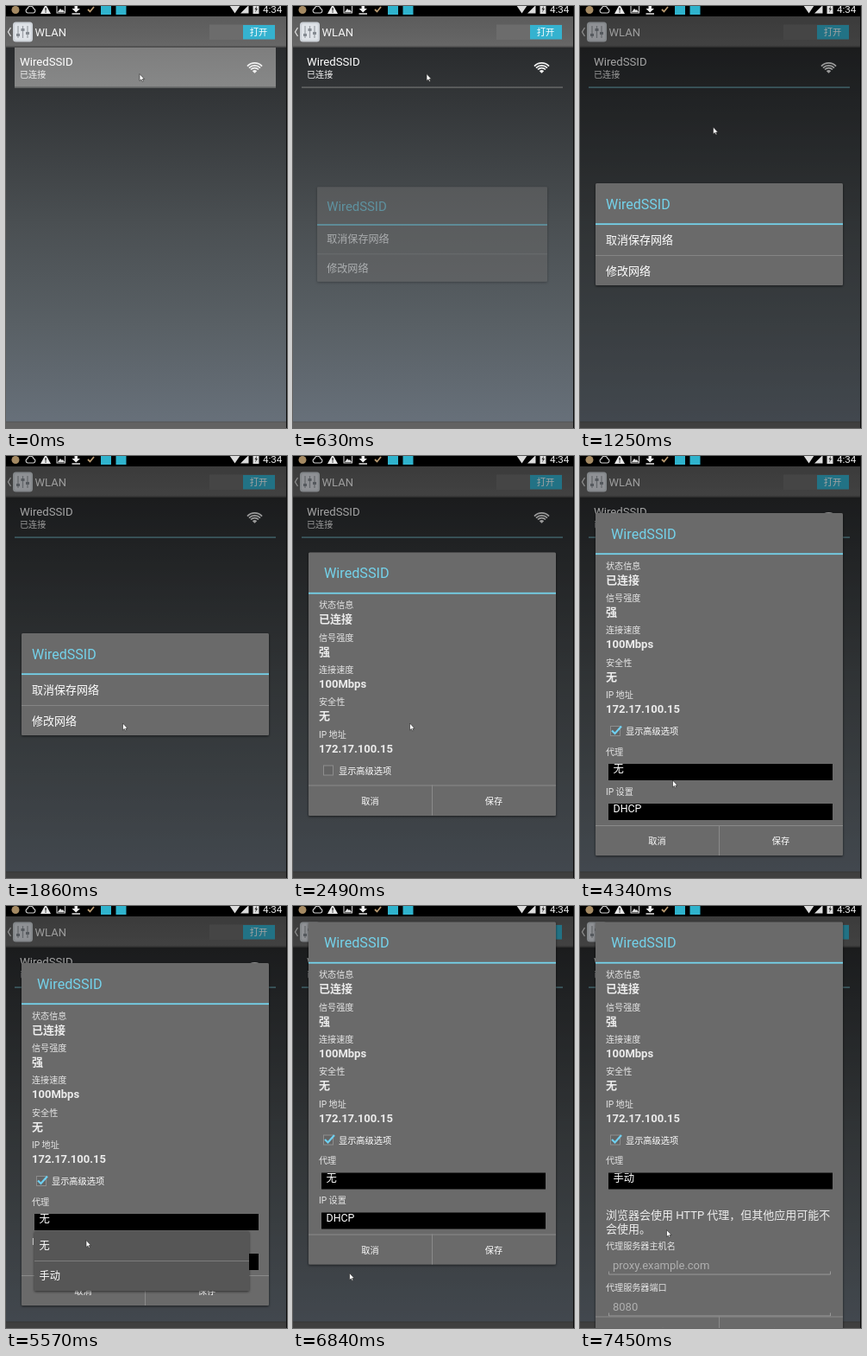
Recreate the animation shown at these times as an HTML page. Size 326x488 px, loop 8 s.

```html
<!DOCTYPE html>
<html lang="zh-CN">
<head>
<meta charset="utf-8">
<title>WLAN</title>
<style>
html, body { margin: 0; width: 100%; height: 100%; overflow: hidden; background: #000; }
svg { display: block; width: 326px; height: 488px; }
text { font-family: Roboto, "Noto Sans CJK SC", "Noto Sans CJK", sans-serif; white-space: pre; }
</style>
</head>
<body>
<svg id="stage" viewBox="0 0 326 488" xmlns="http://www.w3.org/2000/svg"></svg>
<script>
const LOOP = 8000;
const CYAN = '#74d2ea';
const stage = document.getElementById('stage');

const text = (x, y, size, str, fill = '#fff', extra = '') =>
  `<text x="${x}" y="${y}" font-size="${size}" fill="${fill}" ${extra}>${str}</text>`;
const rect = (x, y, w, h, fill, extra = '') =>
  `<rect x="${x}" y="${y}" width="${w}" height="${h}" fill="${fill}" ${extra}/>`;
const path = (d, fill, extra = '') => `<path d="${d}" fill="${fill}" ${extra}/>`;
const line = (d, stroke, width = 1) => path(d, 'none', `stroke="${stroke}" stroke-width="${width}"`);
const group = (id, body, extra = '') => `<g id="${id}" ${extra}>${body}</g>`;

// Fan with its point at (x, y), made of arcs
function wifi(x, y, r, fill) {
  const arc = k => {
    const dx = r * k * 0.72, dy = r * k * 0.69;
    return `M${x - dx} ${y - dy}A${r * k} ${r * k} 0 0 1 ${x + dx} ${y - dy}`;
  };
  return path(arc(0.3) + `L${x} ${y}Z`, fill) +
    line(arc(0.5) + arc(0.72) + arc(0.95), fill, r * 0.14);
}

function statusBar() {
  return rect(0, 0, 326, 12, '#000') +
    '<circle cx="11" cy="4.5" r="4.5" fill="#a58a63"/>' +
    path('M25 8a2.6 2.6 0 0 1 0-5a3.6 3.6 0 0 1 7 0a2.6 2.6 0 0 1 0 5Z', 'none', 'stroke="#ccc" stroke-width="1.2"') +
    path('M46 -2L52 9H40Z', '#e8e8e8') + rect(45.4, 2, 1.3, 3.5, '#222') + rect(45.4, 6.4, 1.3, 1.2, '#222') +
    rect(59, -2, 9.5, 10, 'none', 'stroke="#ddd" stroke-width="1"') + path('M60 7L63 3L65 5L66 4L68 7Z', '#ddd') +
    path('M79.5 -2H83V3H86L81.2 7.5L76.5 3H79.5Z', '#eee') + rect(76.5, 8.3, 9.5, 1.4, '#eee') +
    line('M95 4L97.5 6.5L102 1', '#b99a72', 1.8) +
    rect(110, -2, 12, 12, '#2fb3cd') + rect(127.5, -2, 12, 12, '#2fb3cd') +
    path('M259 -1H272L265.5 8.5Z', '#ddd') +
    path('M272 8.5L281.5 -1V8.5Z', '#ddd') +
    rect(286.5, -2, 7, 11, '#ddd') + path('M291 0L288.5 4H290L289 7.5L292 3H290.5Z', '#333') +
    text(298, 8.3, 11.6, '4:34', '#eee');
}

function settingsPage() {
  const knobs = [[14, 32], [19.5, 26], [25, 30]].map(([x, y]) =>
    rect(x - 0.6, 23, 1.2, 14, '#9a9fa5') + rect(x - 2, y, 4, 3, '#858b92')).join('');
  return rect(0, 12, 325, 476, 'url(#sky)') +
    rect(0, 12, 325, 35.5, 'url(#bar)') + rect(0, 46.5, 325, 1, '#4a4a4a') +
    line('M5.5 25L2.5 30L5.5 35', '#ddd', 1.3) +
    rect(8, 18.5, 23, 23, '#cdd2d8', 'rx="3.5"') + rect(10, 20.5, 19, 19, '#dfe3e8', 'rx="2"') + knobs +
    text(33.5, 34.8, 13, 'WLAN', '#f4f4f4') +
    rect(236, 21.5, 76, 17.5, '#6c6c6c') + rect(275, 22, 37, 16.5, '#35b2cf') +
    text(293, 34, 10.3, '打开', '#fff', 'text-anchor="middle"') +
    rect(10, 48, 303, 46.5, 'url(#press)', 'id="pressed"') +
    rect(10, 93.3, 303, 1.6, '#626464', 'id="rule"') +
    text(16, 68.8, 13.2, 'WiredSSID') +
    text(16, 83.2, 10.1, '已连接', '#eee') +
    wifi(288.5, 77.8, 12.5, '#f0f0f0') +
    rect(0, 481, 325, 7, '#626262') + rect(0, 480.5, 325, 1, '#555');
}

const panel = (y, h, id = '') =>
  rect(18, y, 287, h, '#6a6a6a', `rx="1.5" filter="url(#shadow)" ${id && `id="${id}"`}`);

function menu() {
  return panel(205, 118) +
    text(30, 234.8, 16, 'WiredSSID', CYAN) +
    rect(18, 251.3, 287, 1.8, CYAN) +
    text(30, 275.2, 13, '取消保存网络') +
    rect(18, 288, 287, 1, '#858585') +
    text(30, 311, 13, '修改网络');
}

const field = (y, body) => rect(33, y, 260, 19, '#000') +
  `<svg x="33" y="${y}" width="260" height="19">${body}</svg>`;
const input = (y, hint) => text(38, y - 6, 13, hint, '#b0b0b0') +
  line(`M33.5 ${y - 3}V${y + 0.5}H290.5V${y - 3}`, '#999');

// Details dialog, laid out from its own top edge
function details() {
  const rows = [['状态信息', '已连接'], ['信号强度', '强'], ['连接速度', '100Mbps'],
    ['安全性', '无'], ['IP 地址', '172.17.100.15']];
  const info = rows.map(([label, value], i) => {
    const y = 64.7 + i * 37.35;
    return text(30, y, 10.1, label, '#e6e6e6') + text(30, y + 17, 13, value, '#ececec', 'font-weight="700"');
  }).join('');
  const check = rect(30, 241, 22, 22, 'rgba(51,181,229,.4)', 'id="glow" rx="2"') +
    rect(35.5, 246.5, 11, 11, '#646464', 'stroke="#8d8d8d"') +
    group('tick', line('M37 251.5L40.5 255L48 246.5', '#6fd0f0', 2.2)) +
    text(53, 256.4, 10.2, '显示高级选项');
  const proxy = text(30, 279.8, 10.1, '代理', '#e6e6e6') +
    field(290, '<text id="choice" x="5.5" y="10.4" font-size="12.3" fill="#fff"></text>');
  const ip = text(30, 325.8, 10.1, 'IP 设置', '#e6e6e6') +
    field(336, text(5.5, 10.4, 12.4, 'DHCP'));
  const manual = text(30, 343.6, 13, '浏览器会使用 HTTP 代理，但其他应用可能不', '#eee') +
    text(30, 359.2, 13, '会使用。', '#eee') +
    text(30, 378.8, 10.1, '代理服务器主机名', '#e6e6e6') + input(407, 'proxy.example.com') +
    text(30, 426.8, 10.1, '代理服务器端口', '#e6e6e6') + input(455, '8080');
  const footer = rect(18, 0, 287, 1, '#8a8a8a') + rect(161, 0, 1, 35, '#8a8a8a') +
    text(89.5, 22, 10.2, '取消', '#fff', 'text-anchor="middle"') +
    text(233, 22, 10.2, '保存', '#fff', 'text-anchor="middle"');
  return panel(0, 305, 'sheet') +
    text(36, 29.6, 16.2, 'WiredSSID', CYAN) + rect(18, 46.3, 287, 1.8, CYAN) +
    info + check + group('proxy', proxy) + group('ip', ip) + group('manual', manual) + group('footer', footer);
}

function dropdown() {
  return rect(33, 376, 249, 69, '#575757', 'rx="1" filter="url(#shadow)"') +
    text(38.5, 396.8, 12.2, '无') + rect(33, 410, 249, 1, '#7c7c7c') +
    text(38.5, 432.4, 12.2, '手动');
}

const gradient = (id, ...stops) => `<linearGradient id="${id}" x2="0" y2="1">` +
  stops.map(([at, c]) => `<stop offset="${at}" stop-color="${c}"/>`).join('') + '</linearGradient>';

stage.innerHTML = '<defs>' +
  gradient('sky', [0.07, '#292b2d'], [0.5, '#4a4f52'], [0.75, '#596065'], [1, '#68717b']) +
  gradient('bar', [0, '#5c5c5c'], [1, '#676767']) +
  gradient('press', [0, '#7e7e7e'], [1, '#878888']) +
  '<filter id="shadow" x="-10%" y="-10%" width="120%" height="120%">' +
  '<feDropShadow dx="0" dy="1" stdDeviation="1.8" flood-color="#000" flood-opacity=".6"/></filter></defs>' +
  settingsPage() + rect(0, 12, 325, 476, '#000', 'id="dim" opacity=".36"') + statusBar() +
  rect(325, 0, 1, 488, '#0c0c0c') +
  group('menu', menu()) + group('details', details()) + group('dropdown', dropdown()) +
  group('cursor', path('M0 0V8L1.9 6.4L3.2 9L4.4 8.4L3.2 6H5.6Z', '#fff', 'stroke="#222" stroke-width=".6"'));

const el = id => document.getElementById(id);
const show = (id, on) => { el(id).style.display = on ? '' : 'none'; };

// Pointer stops: start time, x, y
const stops = [[0, 155, 78.5], [1250, 154.5, 140], [1860, 135.5, 309], [3110, 100.5, 345.5], [3740, 43, 364],
  [4340, 107.5, 375], [4960, 100.5, 370.5], [5570, 93, 386.5], [6200, 65.5, 424.5], [7450, 100.5, 374.5]];

// Dialog layouts: start time, top, height, footer offset
const layouts = [[2490, 111.5, 304.5, 269], [4340, 66, 396, 361], [6840, 18.5, 396, 361], [7450, 18.5, 500, 456]];

const latest = (list, t) => list.filter(item => item[0] <= t).pop();

function render(t) {
  const within = (a, b = LOOP) => t >= a && t < b;
  const dimmed = within(1250);
  show('pressed', t < 630);
  show('dim', dimmed);
  el('rule').setAttribute('fill', dimmed ? '#5f9199' : '#626464');

  const opening = within(630, 1250);
  show('menu', within(630, 2490));
  el('menu').setAttribute('opacity', opening ? 0.52 : 1);
  el('menu').setAttribute('transform',
    opening ? 'translate(161.5 264) scale(.93) translate(-161.5 -264)' : '');

  const layout = latest(layouts, t);
  show('details', layout);
  if (layout) {
    const [, top, height, foot] = layout;
    el('details').setAttribute('transform', `translate(0 ${top})`);
    el('sheet').setAttribute('height', height);
    el('footer').setAttribute('transform', `translate(0 ${foot})`);
  }
  show('glow', within(3740, 4340));
  show('tick', within(4340));
  show('proxy', within(4340));
  show('ip', within(4340, 7450));
  show('manual', within(7450));
  el('choice').textContent = t < 7450 ? '无' : '手动';
  show('dropdown', within(5570, 6840));

  const [, x, y] = latest(stops, t);
  el('cursor').setAttribute('transform', `translate(${x} ${y})`);
}

const start = performance.now();
function tick() {
  render((performance.now() - start) % LOOP);
  requestAnimationFrame(tick);
}
tick();
</script>
</body>
</html>
```
